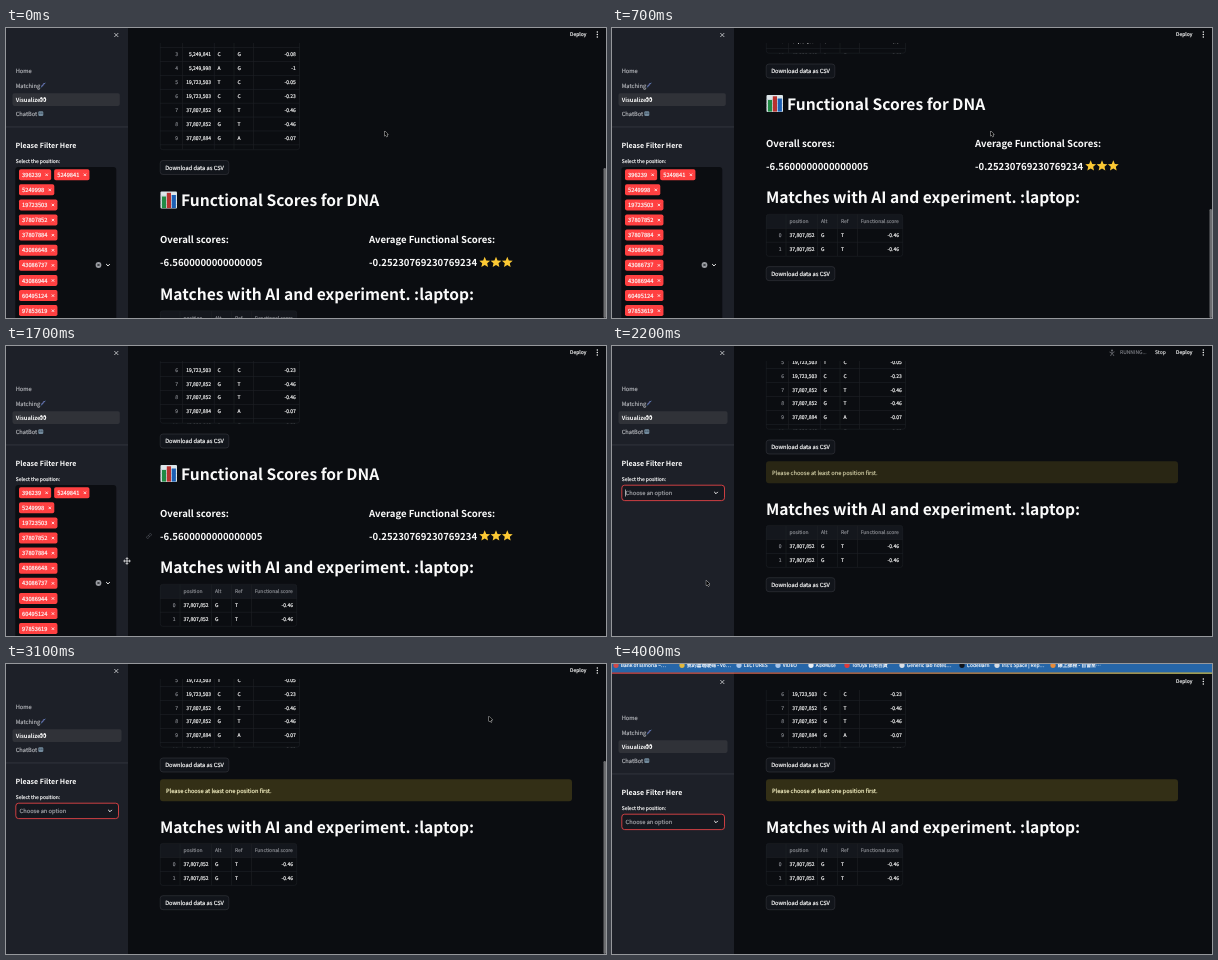
These frames come from a looping animation (600x290 px, 4100 ms). An HTML page with a canvas:

```html
<!DOCTYPE html>
<html lang="en">
<head>
<meta charset="utf-8">
<title>Dashboard filter demo</title>
<style>
  html, body { margin: 0; width: 600px; height: 290px; overflow: hidden; background: #0b0d11; }
  canvas { display: block; width: 600px; height: 290px; }
</style>
</head>
<body>
<canvas id="stage" width="600" height="290"></canvas>
<script>
const ctx = document.getElementById('stage').getContext('2d');
ctx.textRendering = 'geometricPrecision';
const W = 600, H = 290, LOOP = 4100, STEP = 100;
const FONT = '"Noto Sans CJK TC", "Noto Sans CJK JP", "Noto Sans CJK SC", "Noto Sans CJK", "Noto Sans", sans-serif';
const SIZE = { h1: 15.6, h3: 9.56, h2: 7.05, body: 5.7, small: 4.99 };
const MAIN = '#0b0d11', SIDE = '#1d2028', LINE = '#1e2126', GRAY = '#85878d', TEXT = '#fafafa', RED = '#ff4041';
const ROW = 13.9, CLEARED = 1900;

// Keyframes are [time, value...]
const SCROLL = [[0, 139.5], [300, 99.3], [600, 50], [700, 43], [800, 43], [1200, 88], [1400, 95], [1900, 95], [2000, 101]];
const CHROME = [[3300, 0], [3400, 4], [3500, 8], [3600, 10.5], [3700, 11]];
const POINTER = [[1200, 378.6, 103], [1500, 255, 145], [1600, 170, 188], [1700, 121, 215], [1800, 100, 230],
  [1900, 94.3, 234.5], [2500, 94.3, 234.5], [2700, 210, 180], [2900, 400, 95], [3100, 483, 52.5], [3300, 480, 4]];

const TAGS = ['396239', '5249841', '5249998', '19723503', '37807852', '37807884',
  '43086648', '43086737', '43086944', '60495124', '97853619'];
const SCORES = [
  ['5,249,841', 'C', 'G', '-0.08'], ['5,249,998', 'A', 'G', '-1'], ['19,723,503', 'T', 'C', '-0.05'],
  ['19,723,503', 'C', 'C', '-0.23'], ['37,807,852', 'G', 'T', '-0.46'], ['37,807,852', 'G', 'T', '-0.46'],
  ['37,807,884', 'G', 'A', '-0.07'], ['43,086,648', 'A', 'G', '-0.31']
];
const MATCHES = [['37,807,852', 'G', 'T', '-0.46'], ['37,807,852', 'G', 'T', '-0.46']];
const BOOKMARKS = [
  [4, '#d04a4a', 'Bank of Elmoria ~…'], [70, '#e2b73c', '我的雲端硬碟 - Vo…'], [127, '#a9c6ea', 'LECTURES'],
  [166, '#a9c6ea', 'VIDEO'], [199, '#e8eef5', 'AskMuse'], [235, '#e03a3a', 'Tofuya 日用百貨'],
  [290, '#d8dde4', 'Generic lab notes…'], [350, '#10151c', 'CodeBarn'], [385, '#d8dde4', "Iris's Space | Rep…"],
  [441, '#e58b3a', '線上課程 - 自習室…']
];

function track(keys, t) {
  if (t <= keys[0][0]) return keys[0].slice(1);
  for (let i = 1; i < keys.length; i++) {
    const [a, b] = [keys[i - 1], keys[i]];
    if (t <= b[0]) {
      const k = (t - a[0]) / (b[0] - a[0]);
      return a.slice(1).map((v, j) => v + (b[j + 1] - v) * k);
    }
  }
  return keys[keys.length - 1].slice(1);
}

function setFont(size, weight) { ctx.font = `${weight} ${size}px ${FONT}`; }

function text(str, x, y, size, color = TEXT, weight = 400, align = 'left') {
  const baseline = y + size * 0.36 + 0.2;
  setFont(size, weight);
  ctx.textAlign = align;
  ctx.fillStyle = color;
  ctx.fillText(str, x, baseline);
  if (weight === 400) {
    // A hairline gives small text a medium weight
    ctx.strokeStyle = color;
    ctx.lineWidth = 0.18;
    ctx.strokeText(str, x, baseline);
  }
}

function rect(x, y, w, h, color) {
  ctx.fillStyle = color;
  ctx.fillRect(x, y, w, h);
}

function box(x, y, w, h, r, fill, stroke, width = 0.6) {
  ctx.beginPath();
  ctx.roundRect(x, y, w, h, r);
  if (fill) { ctx.fillStyle = fill; ctx.fill(); }
  if (stroke) { ctx.strokeStyle = stroke; ctx.lineWidth = width; ctx.stroke(); }
}

function path(points, color, width, closed) {
  ctx.beginPath();
  points.forEach(([x, y]) => ctx.lineTo(x, y));
  if (closed) ctx.closePath();
  ctx.strokeStyle = color;
  ctx.lineWidth = width;
  ctx.stroke();
}

function oval(x, y, rx, ry, color) {
  ctx.beginPath();
  ctx.ellipse(x, y, rx, ry, 0, 0, Math.PI * 2);
  ctx.fillStyle = color;
  ctx.fill();
}

function cross(x, y, r, color, width) {
  path([[x - r, y - r], [x + r, y + r]], color, width);
  path([[x - r, y + r], [x + r, y - r]], color, width);
}

function chevron(x, y) { path([[x - 1.8, y - 0.9], [x, y + 0.9], [x + 1.8, y - 0.9]], TEXT, 1); }

function star(x, y, r) {
  ctx.beginPath();
  for (let i = 0; i < 10; i++) {
    const a = -Math.PI / 2 + i * Math.PI / 5, d = i % 2 ? r * 0.46 : r;
    ctx.lineTo(x + d * Math.cos(a), y + d * Math.sin(a));
  }
  ctx.closePath();
  ctx.fillStyle = '#fcc934';
  ctx.fill();
}

function chartIcon(x, y) {
  box(x, y, 16.5, 17, 1, '#dde6ea');
  for (let i = 1; i < 4; i++) rect(x, y + i * 4.2, 16.5, 0.5, '#b6c6d0');
  rect(x + 1.4, y + 5, 4.2, 11.6, '#218a45');
  rect(x + 6.3, y + 1.3, 4.2, 15.3, '#b8322f');
  rect(x + 11.2, y + 3.5, 4.2, 13.1, '#1c5fb4');
}

function button(y) {
  box(154.2, y - 7, 68.6, 14, 2.8, '#12151b', '#34373d');
  text('Download data as CSV', 188.5, y, SIZE.body, TEXT, 400, 'center');
}

// cols: vertical line positions, the last one being the right edge
function grid(top, bottom, cols, firstRow, firstIndex, rows, header) {
  const right = cols[4];
  ctx.save();
  ctx.beginPath();
  ctx.roundRect(154, top, right - 154, bottom - top, 2.5);
  ctx.clip();
  if (header !== undefined) {
    rect(154, top, right - 154, ROW, '#14171d');
    ['position', 'Alt', 'Ref', 'Functional score'].forEach((label, i) =>
      text(label, cols[i] + 3.4, header, SIZE.small, GRAY));
  }
  rows.forEach((row, i) => {
    const y = firstRow + i * ROW;
    rect(154, y - ROW / 2 - 0.3, right - 154, 0.6, LINE);
    text(firstIndex + i, cols[0] - 4.5, y, SIZE.small, GRAY, 400, 'right');
    text(row[0], cols[1] - 3.2, y, SIZE.small, TEXT, 400, 'right');
    text(row[1], cols[1] + 3.4, y, SIZE.small);
    text(row[2], cols[2] + 3.4, y, SIZE.small);
    text(row[3], right - 4, y, SIZE.small, TEXT, 400, 'right');
  });
  cols.slice(0, 4).forEach(x => rect(x - 0.3, top, 0.6, bottom - top, LINE));
  ctx.restore();
  box(154.3, top, right - 154.6, bottom - top, 2.5, null, LINE);
}

function matches(title) {
  text('Matches with AI and experiment. :laptop:', 154, title, SIZE.h1, TEXT, 700);
  const header = title + 23.7;
  grid(header - 7, header + 35, [174, 205.6, 225.6, 245.3, 291], header + ROW, 0, MATCHES, header);
  button(title + 76);
}

function linkIcon(x, y) {
  ctx.save();
  ctx.translate(x, y);
  ctx.rotate(-Math.PI / 4);
  box(-3, -1, 3.2, 2, 1, null, '#4b4e55', 0.7);
  box(-0.2, -1, 3.2, 2, 1, null, '#4b4e55', 0.7);
  ctx.restore();
}

function content(t, y) {
  grid(y - 176, y - 17.8, [176.5, 208.2, 228, 247.7, 293.8], y - 29.6 - 6 * ROW, 3, SCORES);
  button(y);
  if (t >= 2000) {
    ctx.globalAlpha = t < 2500 ? 0.75 : 1;
    box(154, y + 14.3, 412, 22, 3, '#332f16');
    text('Please choose at least one position first.', 160, y + 25.3, SIZE.body, '#f6f2c4');
    ctx.globalAlpha = 1;
    matches(y + 61.7);
    return;
  }
  chartIcon(154.5, y + 24);
  text('Functional Scores for DNA', 175, y + 33, SIZE.h1, TEXT, 700);
  text('Overall scores:', 154, y + 72, SIZE.h3, TEXT, 700);
  text('Average Functional Scores:', 363, y + 72, SIZE.h3, TEXT, 700);
  text('-6.5600000000000005', 154, y + 95, SIZE.h3, TEXT, 700);
  text('-0.25230769230769234', 363, y + 95, SIZE.h3, TEXT, 700);
  for (let i = 0; i < 3; i++) star(478.7 + i * 11.3, y + 95, 5.7);
  if (t >= 1600 && t < 1800) linkIcon(143, y + 95);
  matches(y + 126.6);
}

function header(t, off) {
  rect(122, 0, W - 122, 15 + off, MAIN);
  if (t >= CLEARED && t < 2500) {
    ctx.globalAlpha = t < 2300 ? 0.8 : 0.35;
    oval(500, 4.6, 1, 1, GRAY);
    path([[497.5, 6], [500, 7], [502.5, 5.8]], GRAY, 0.8);
    path([[498.5, 10], [500, 7], [502, 10]], GRAY, 0.8);
    text('RUNNING...', 508, 6.5, SIZE.small, GRAY);
    text('Stop', 543, 6.5, SIZE.small, TEXT);
    ctx.globalAlpha = 1;
  }
  text('Deploy', 564, 6.5 + off, SIZE.small);
  for (let i = -1; i < 2; i++) oval(591.3, 6.5 + off + i * 2.5, 0.75, 0.75, TEXT);
}

function navigation(t) {
  cross(110.3, 7, 2, '#d5d6d9', 0.8);
  box(6.5, 65.3, t < CLEARED ? 107.3 : 109, 12.6, 1.8, '#303238');
  const dim = '#adafb4';
  text('Home', 9.7, 43.1, SIZE.body, dim);
  text('Matching', 9.7, 57.3, SIZE.body, dim);
  text('Visualize', 9.7, 71.5, SIZE.body, TEXT, 700);
  text('ChatBot', 9.7, 85.8, SIZE.body, dim);
  path([[34.8, 59.3], [36.3, 58.2], [37.2, 56.4], [39.4, 55]], '#4e83bd', 0.9);
  path([[35, 57.8], [36.8, 58], [37.4, 55.5], [38.9, 55.8]], '#7a6fb0', 0.6);
  for (const x of [35.3, 38.7]) {
    oval(x, 71.5, 1.5, 2.5, '#f4f4f4');
    oval(x - 0.4, 71.8, 0.7, 1.1, '#22242a');
  }
  box(32.3, 83.3, 5, 4.6, 1.2, '#71899b');
  oval(33.9, 85.2, 0.6, 0.6, '#2e3f50');
  oval(35.9, 85.2, 0.6, 0.6, '#2e3f50');
  rect(0, 98.6, 122, 0.7, '#3a3d45');
}

function tag(label, x, y) {
  setFont(SIZE.body, 400);
  const w = ctx.measureText(label).width + 13.2;
  box(x, y - 5.4, w, 11, 1.8, RED);
  text(label, x + 3.1, y, SIZE.body);
  cross(x + w - 4.5, y + 0.2, 1.2, TEXT, 0.8);
  return x + w + 3;
}

function filter(t) {
  text('Please Filter Here', 9.5, 117, SIZE.h2, TEXT, 700);
  text('Select the position:', 9.7, 132.7, SIZE.small);
  if (t >= CLEARED) {
    box(9.8, 139.2, 102.7, 15.4, 2.8, '#15181f', '#e04346', 0.9);
    text('Choose an option', 13.6, 146.8, SIZE.body, '#a0a2a7');
    if (t < 2500) rect(13, 143.5, 0.6, 7, TEXT);
    chevron(104, 146.8);
    return;
  }
  box(9.3, 139, 101, 160, 3, MAIN);
  const next = tag(TAGS[0], 13, 146.6);
  tag(TAGS[1], next, 146.6);
  TAGS.slice(2).forEach((label, i) => tag(label, 13, 161.7 + i * 15.1));
  oval(92.5, 237, 2.9, 2.9, '#9b9da3');
  cross(92.5, 237, 1.1, MAIN, 0.8);
  chevron(102, 237);
}

function browserBar(off) {
  if (off <= 0) return;
  rect(0, 0, W, off - 2.4, '#2666a8');
  BOOKMARKS.forEach(([x, color, label]) => {
    oval(x, off - 9.7, 2.6, 2.6, color);
    text(label, x + 4.8, off - 9.7, 4.9, '#f1f5fa');
  });
  const stripe = ctx.createLinearGradient(0, 0, W, 0);
  stripe.addColorStop(0, '#ff4b4b');
  stripe.addColorStop(1, '#fffd80');
  rect(0, off - 2.4, W, 1, stripe);
}

function scrollbar(t, y) {
  const early = t < 1500, late = t >= 3100 && t < 3500;
  if (!early && !late) return;
  const top = early ? 140 + (139.5 - y) * 0.425 : 97;
  box(597.5, top, 2.5, H - top, 1.2, '#6c6d70');
}

function pointer(t) {
  if (t > 3300) return;
  const [x, y] = track(POINTER, t);
  ctx.save();
  ctx.translate(x, y);
  if (t === 1700) {
    for (let i = 0; i < 4; i++) {
      path([[0, 0], [3, 0]], '#eee', 0.8);
      path([[2, -1.2], [3.4, 0], [2, 1.2]], '#eee', 0.8);
      ctx.rotate(Math.PI / 2);
    }
  } else {
    ctx.scale(0.82, 0.82);
    const arrow = [[0, 0], [0, 6], [1.4, 4.8], [2.4, 7], [3.4, 6.5], [2.4, 4.4], [4.2, 4.3]];
    path(arrow, '#d8d8d8', 1.1, true);
    ctx.fillStyle = '#000';
    ctx.fill();
  }
  ctx.restore();
}

function draw(t) {
  const [y] = track(SCROLL, t), [off] = track(CHROME, t);
  rect(0, 0, W, H, MAIN);
  content(t, y);
  header(t, off);
  rect(0, 0, 122, H, SIDE);
  ctx.save();
  ctx.translate(0, off);
  navigation(t);
  filter(t);
  ctx.restore();
  scrollbar(t, y);
  browserBar(off);
  pointer(t);
}

function tick(now) {
  draw(Math.floor((now % LOOP) / STEP) * STEP);
  requestAnimationFrame(tick);
}
draw(0);
requestAnimationFrame(tick);
</script>
</body>
</html>
```
